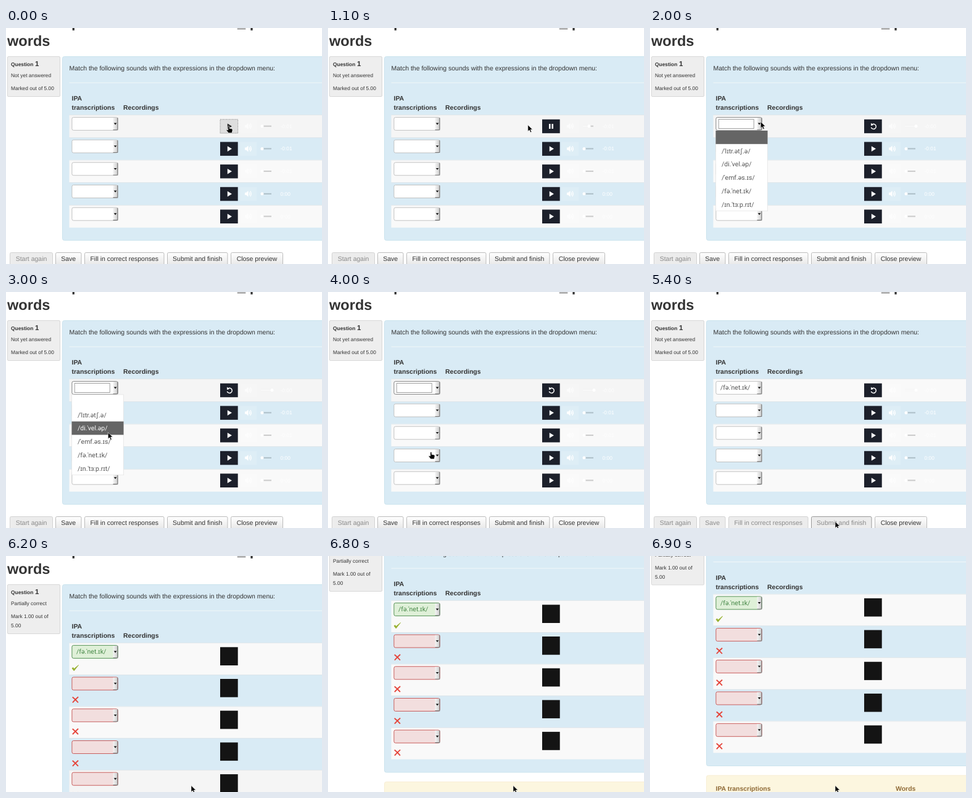
These frames come from a looping animation (512 px wide and 384 px high, 7000 ms). An HTML page:

```html
<!DOCTYPE html>
<html lang="en">
<head>
<meta charset="utf-8">
<title>Matching question</title>
<style>
  html, body { margin: 0; width: 100%; height: 100%; overflow: hidden; background: #fff; }
  svg { display: block; width: 100vw; height: 100vh; }
  text { font-family: "Liberation Sans", Arial, sans-serif; font-size: 10.47px; fill: #333; white-space: pre; text-rendering: geometricPrecision; }
  .bold { font-weight: bold; }
  .title { font-size: 23.6px; font-weight: bold; }
  .small { font-size: 8.4px; }
  .number { font-size: 11.5px; font-weight: bold; }
  .ipa { font-family: Roboto, "Noto Sans", sans-serif; font-size: 10.5px; fill: #555; }
  .time { font-size: 8.4px; fill: #fff; }
  .notice { font-weight: bold; fill: #8f6a36; }
</style>
</head>
<body>
<svg id="stage" viewBox="0 0 512 384">
  <defs>
    <linearGradient id="button" x2="0" y2="1">
      <stop stop-color="#fff"/><stop offset="1" stop-color="#e6e6e6"/>
    </linearGradient>
    <linearGradient id="arrow" x2="1" y2="0">
      <stop stop-color="#f4f4f4"/><stop offset="1" stop-color="#cfcfcf"/>
    </linearGradient>
  </defs>
  <g id="scene"></g>
</svg>
<script>
const LOOP = 7000, STEP = 100;
const CLICK_PLAY = 800, SOUND_END = 1400, OPEN = 1800, CLOSE = 4000,
      CHOSEN = 4100, SUBMIT = 5200, RESULT = 6200;
const ROW = 36.7, RESULT_ROW = 51.7, ITEM = 21.8;
const PANEL = '#d9ebf5', STRIPE = '#f9f9f9', HOVER = '#f5f5f5';
const ANSWER = '/fə.ˈnet.ɪk/';
const OPTIONS = ['', '/ˈlɪtr.ətʃ.ə/', '/di.ˈvel.əp/', '/ˈemf.əs.ɪs/', ANSWER, '/ɪn.ˈtɜːp.rɪt/'];
const TIMES = ['-0:01', '-0:01', '-0:01', '0:00', '0:00'];
const BUTTONS = [[6, 70, 'Start again'], [80, 42.5, 'Save'], [127, 129.5, 'Fill in correct responses'],
                 [261, 98.5, 'Submit and finish'], [364, 85, 'Close preview']];

// time, x, y
const POINTER = [[0, 360, 159], [1000, 360, 159], [1500, 179.3, 152.5], [2200, 179.3, 152.5],
  [2500, 180, 186], [2600, 178, 191], [3000, 165.3, 228.5], [3300, 164, 258], [3600, 166, 260],
  [4100, 166, 260], [4700, 285, 361], [5000, 300, 373.5]];
// time, offset
const SCROLL = [[6400, 0], [6500, 9], [6600, 28], [6700, 50], [6800, 69], [6900, 79.5]];

function track(keys, t) {
  const next = keys.findIndex(k => k[0] > t);
  if (next < 0) return keys.at(-1).slice(1);
  if (next === 0) return keys[0].slice(1);
  const a = keys[next - 1], b = keys[next], u = (t - a[0]) / (b[0] - a[0]);
  return a.slice(1).map((v, i) => v + (b[i + 1] - v) * u);
}

const rows = draw => [0, 1, 2, 3, 4].map(draw).join('');
const inside = (p, x, y, w, h) => p.x >= x && p.x <= x + w && p.y >= y && p.y <= y + h;
const box = (x, y, w, h, fill, extra = '') =>
  `<rect x="${x}" y="${y}" width="${w}" height="${h}" fill="${fill}" ${extra}/>`;
const text = (x, y, label, cls = '', extra = '') =>
  `<text x="${x}" y="${y}" class="${cls}" ${extra}>${label}</text>`;
const path = (d, fill, extra = '') => `<path d="${d}" fill="${fill}" ${extra}/>`;
const at = (x, y, body) => `<g transform="translate(${x} ${y})">${body}</g>`;

function infoBox(height, lines) {
  return box(2.5, 46.5, 85, height, '#eee', 'stroke="#d8d8d8" rx="1.5"') +
    text(8, 61.5, 'Question', 'small bold') + text(47, 61.5, '1', 'number') +
    lines.map(([y, label]) => text(8, y, label, 'small')).join('');
}

function pageTop(panelHeight) {
  return text(106, -1, 'p', 'title') + text(375, -1, '_ p', 'title') + text(2, 28.5, 'words', 'title') +
    box(91.5, 46.5, 430, panelHeight, PANEL, 'stroke="#cbe4ee" rx="3"') +
    text(102.5, 68.7, 'Match the following sounds with the expressions in the dropdown menu:') +
    box(102.5, 88.5, 410, 1.2, '#eef5f8') +
    text(106.5, 118, 'IPA', 'bold') + text(106.5, 133, 'transcriptions', 'bold') +
    text(190, 133, 'Recordings', 'bold');
}

function tableRow(i, pitch, hovered) {
  const fill = hovered ? HOVER : i % 2 ? PANEL : STRIPE;
  const y = 141.3 + i * pitch;
  return box(102.5, y, 410, pitch, fill) + box(102.5, y, 410, .7, '#dde3e6');
}

function select(y, { fill = '#fff', border = '#bbb', value = '', color = '#555', focus = false } = {}) {
  return at(106.5, y,
    box(.4, .4, 74.2, 21, fill, `stroke="${focus ? '#777' : border}" stroke-width=".9" rx="2.5"`) +
    box(67, 1, 7, 20, 'url(#arrow)') +
    path('M67 20.8H74.3V1', 'none', 'stroke="#777" stroke-width="1.1"') +
    path('M68.2 9.5H73L70.6 12.4Z', '#111') +
    (focus ? box(4.7, 3.6, 57, 15, 'none', 'stroke="#888" stroke-width=".8"') : '') +
    text(7.5, 14, value, 'ipa', `style="fill:${color}"`));
}

function buttonIcon(kind, color) {
  if (kind === 'play') return path('M11.8 6.8L19 11.2L11.8 15.6Z', color);
  if (kind === 'pause') return path('M11 7.2H13.5V15.2H11ZM15.5 7.2H18V15.2H15.5Z', color);
  return path('M12.4 8.6A4.1 4.1 0 1 1 11.3 13', 'none', `stroke="${color}" stroke-width="1.5"`) +
    path('M11 10.4V5.8L15 9.2Z', color);
}

function player(i, t, pointer) {
  const y = 148.7 + i * ROW, first = i === 0;
  const kind = !first || t < CLICK_PLAY ? 'play' : t < SOUND_END ? 'pause' : 'replay';
  const played = first ? Math.min(1, Math.max(0, (t - CLICK_PLAY) / (SOUND_END - CLICK_PLAY))) : 0;
  const hovered = inside(pointer, 347, y, 28.5, 22);
  const thumb = 415 - 347 + played * 16;
  const time = first && played === 1 ? '-0:00' : TIMES[i];
  const opacity = i % 2 ? 1 : .75;
  return at(347, y,
    box(0, 0, 28.7, 22.5, hovered ? '#dedede' : '#1c202b',
      hovered ? 'stroke="#555" stroke-width=".8" stroke-dasharray="1 1.5"' : '') +
    buttonIcon(kind, hovered ? '#222' : '#fff') +
    box(31.5, 0, 27.5, 22.5, '#fff', 'opacity=".12"') +
    `<g opacity="${opacity}">` +
    path('M40 9H42.3L45.5 6V16L42.3 13H40Z', '#fff') +
    path('M47 8.5Q49 11 47 13.5M48.6 6.6Q52 11 48.6 15.4', 'none', 'stroke="#fff" stroke-width="1.2"') +
    text(97.5, 14, time, 'time') + '</g>' +
    box(66, 10, 17, 2, i % 2 ? '#adbfc8' : '#cacaca') +
    box(66, 10, thumb - 66, 2, '#fff') +
    `<circle cx="${thumb}" cy="11" r="2.5" fill="#fff"/>`);
}

function formButton([x, w, label], i, t, pointer) {
  const disabled = i === 0 || t >= SUBMIT && i < 4;
  const hovered = inside(pointer, x, 366, w, 20);
  const fill = disabled ? '#ececec' : hovered ? '#e6e6e6' : 'url(#button)';
  const border = disabled && i === 3 ? '#999' : disabled ? '#d2d2d2' : '#bbb';
  return box(x + .5, 365.5, w - 1, 21.5, fill, `stroke="${border}" rx="2"`) +
    text(x + w / 2, 379.3, label, '', `text-anchor="middle" ${disabled ? 'style="fill:#8a8a8a"' : ''}`);
}

function dropdown(pointer) {
  const chosen = Math.min(5, Math.max(0, Math.floor((pointer.y - 167) / ITEM)));
  return at(106.5, 167,
    box(0, 0, 84, 6 * ITEM, '#fff', 'stroke="#ddd" stroke-width=".6"') +
    box(0, chosen * ITEM, 84, ITEM, '#656565') +
    OPTIONS.map((label, i) => text(9.5, i * ITEM + 14.8, label, 'ipa',
      i === chosen ? 'style="fill:#fff"' : '')).join(''));
}

function questionPage(t, pointer) {
  const open = t >= OPEN && t < CLOSE;
  const hoverRow = t <= CLOSE ? 0 : Math.floor((pointer.y - 141.3) / ROW);
  return pageTop(299) +
    infoBox(65, [[80, 'Not yet answered'], [101, 'Marked out of 5.00']]) +
    rows(i => tableRow(i, ROW, i === hoverRow)) +
    rows(i => select(145 + i * ROW, i ? {} :
      { focus: t >= OPEN && t < SUBMIT, value: t >= CHOSEN ? ANSWER : '' })) +
    rows(i => player(i, t, pointer)) +
    BUTTONS.map((b, i) => formButton(b, i, t, pointer)).join('') +
    (open ? dropdown(pointer) : '');
}

function mark(i) {
  return at(112.5, 182 + i * RESULT_ROW, i === 0
    ? path('M-5.5 .8L-2.3 4.8L5 -4.5L-2.2 1.6L-3.8 -.6Z', '#96b02e', 'stroke="#96b02e" stroke-width=".8"')
    : path('M-4.8 -4.2Q0 -.5 4.4 4.8M4.6 -4.4Q0 -.5 -4.6 4.8', 'none', 'stroke="#e5443a" stroke-width="1.9"'));
}

function resultPage(t, pointer) {
  const [scroll] = track(SCROLL, t);
  const hoverRow = Math.floor((pointer.y + scroll - 141.3) / RESULT_ROW);
  const right = { fill: '#dff0d8', border: '#468847', value: ANSWER, color: '#468847' };
  const wrong = { fill: '#f2dede', border: '#c4504e' };
  return at(0, -scroll,
    pageTop(374.5) +
    infoBox(80, [[80, 'Partially correct'], [101, 'Mark 1.00 out of'], [116, '5.00']]) +
    rows(i => tableRow(i, RESULT_ROW, i === hoverRow)) +
    rows(i => select(145 + i * RESULT_ROW, i ? wrong : right) + mark(i) +
      box(347, 148.3 + i * RESULT_ROW, 28.7, 29.7, '#141414')) +
    box(91.5, 436.5, 430, 120, '#fcf6df', 'stroke="#f8eed5" rx="3"') +
    text(106.5, 461.5, 'IPA transcriptions', 'notice') + text(398, 461.5, 'Words', 'notice'));
}

function cursor(t, pointer) {
  const open = t >= OPEN && t < CLOSE;
  const hand = !open && t < SUBMIT && (
    [0, 1, 2, 3, 4].some(i => inside(pointer, 347, 148.7 + i * ROW, 28.5, 22) ||
      inside(pointer, 106.5, 145 + i * ROW, 75, 22)) ||
    BUTTONS.slice(1).some(([x, w]) => inside(pointer, x, 366, w, 20)));
  const shape = hand
    ? 'M-.2 1Q1-.6 2 1V4.3L5.6 4.9Q7.5 5.3 7 7.5L6 11.8H.5L-2.8 7.4Q-2.6 5.8-.2 7Z'
    : 'M0 0V10.5L2.5 8.3L4.2 12.2L6 11.4L4.3 7.6H7.6Z';
  return at(pointer.x, pointer.y, path(shape, '#000', 'stroke="#fff" stroke-width=".6"'));
}

const scene = document.getElementById('scene');
let shown = -1;

function draw(now) {
  const t = Math.floor(now % LOOP / STEP) * STEP;
  if (t !== shown) {
    shown = t;
    const [x, y] = track(POINTER, t), pointer = { x, y };
    scene.innerHTML = (t < RESULT ? questionPage : resultPage)(t, pointer) + cursor(t, pointer);
  }
}

const start = performance.now();
function tick() {
  draw(performance.now() - start);
  requestAnimationFrame(tick);
}
tick();
</script>
</body>
</html>
```
